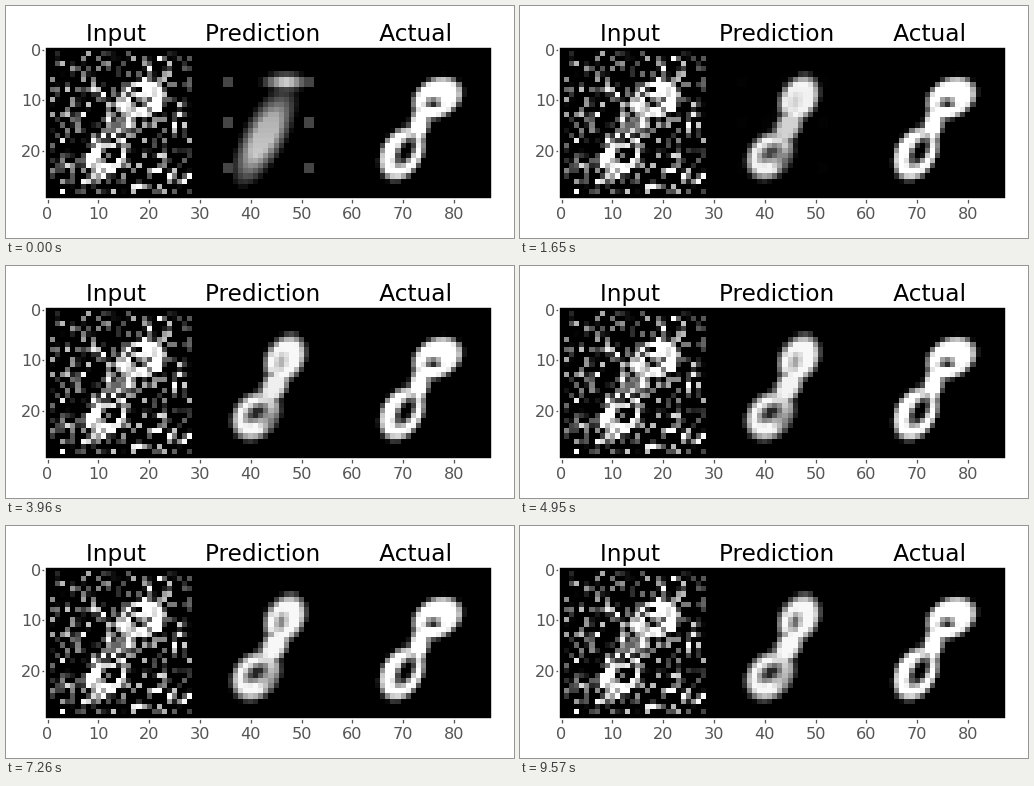
Write a matplotlib script that moves like this. It is 508x232 px and loops after 9.9 s.

```python
import numpy as np
import matplotlib.pyplot as plt
from matplotlib.animation import FuncAnimation

W, H, DPI = 508, 232, 64
FRAMES, INTERVAL = 30, 330
N = 28                          # side of one digit tile
LEFT, TOP, WIDTH = 39, 41, 447  # axes box in pixels
HEIGHT = WIDTH * (N + 2) / (3 * N + 4)
GREY = "#555555"

cols, rows = np.meshgrid(np.arange(N) + 0.5, np.arange(N) + 0.5)


def px(n):
    """Screen pixels to points."""
    return n * 72 / DPI


def ellipse(x, y, a, b, angle, soft=1.2):
    """Soft-edged ellipse; the angle turns its long side up from the right."""
    c, s = np.cos(np.radians(angle)), np.sin(np.radians(angle))
    dx, dy = cols - x, rows - y
    r = np.hypot((dx * c - dy * s) / a, (dx * s + dy * c) / b)
    return np.clip((1 - r) * min(a, b) / soft + 0.5, 0, 1)


def merge(*parts):
    return np.maximum.reduce(parts)


def actual_digit():
    body = merge(ellipse(18.2, 9.2, 5, 3.7, 30),
                 ellipse(14.6, 14.5, 4, 1.8, 75),
                 ellipse(11.3, 20, 5.4, 3.8, 60))
    eye = ellipse(17.4, 10.2, 1.2, 0.7, 0)
    loop = ellipse(12, 19.6, 2.9, 1.4, 60)
    return body * (1 - eye) * (1 - loop)


def first_guess():
    body = ellipse(13.3, 16.5, 8, 3.1, 62, 2.8) * (0.5 + 0.4 * rows / N)
    img = merge(body, 0.85 * ellipse(17.4, 6, 3.2, 1.2, 0, 1.6))
    for r in (5, 13, 22):
        for c in (5, 21):
            img[r:r + 2, c:c + 2] = np.maximum(img[r:r + 2, c:c + 2], 0.27)
    return img


def prediction(i):
    p = i / (FRAMES - 1)
    size = 1 - 0.1 * np.exp(-i / 6)
    neck = 1 - 0.4 * np.exp(-i / 5)
    body = merge(ellipse(17.3, 9.3, 4.7 * size, 3.5 * size, 60, 1.6),
                 neck * ellipse(15.2, 14.7, 4, 2.1, 60, 1.6),
                 ellipse(11.5, 20.5, 5 * size, 4 * size, 45, 1.6))
    eye = 0.62 * p ** 0.8 * ellipse(16.4, 10, 1.5, 0.9, 75, 1.4)
    loop = 0.85 * (1 - np.exp(-i / 2.5)) * ellipse(11.7, 19.9, 2.3, 1.3, 35, 1.6)
    corner = (0.6 - 0.28 * p) * ellipse(14.6, 21.4, 1.8, 1.6, 60, 2.5)
    img = 0.97 * body * (1 - eye) * (1 - loop) * (1 - corner)
    rest = 0.5 ** i
    return rest * FIRST + (1 - rest) * img


FIRST = first_guess()
ACTUAL = actual_digit()
rng = np.random.default_rng(7)
NOISY = np.clip(ACTUAL + rng.normal(0, 0.5, (N, N)), 0, 1)


def grid(i):
    """Three tiles side by side with a one-cell black border."""
    out = np.zeros((N + 2, 3 * N + 4))
    for k, tile in enumerate((NOISY, prediction(i), ACTUAL)):
        x = 1 + k * (N + 1)
        out[1:N + 1, x:x + N] = tile
    return out


plt.rcParams["font.family"] = "DejaVu Sans"
fig = plt.figure(figsize=(W / DPI, H / DPI), dpi=DPI, facecolor="white")
ax = fig.add_axes([LEFT / W, 1 - (TOP + HEIGHT) / H, WIDTH / W, HEIGHT / H])
image = ax.imshow(grid(0), cmap="gray", vmin=0, vmax=1,
                  interpolation="nearest", aspect="auto")
ax.set_xticks(range(0, 81, 10))
ax.set_yticks(range(0, 21, 10))
ax.tick_params(length=px(3.5), width=px(1.3), color=GREY, labelcolor=GREY,
               labelsize=px(16.15))
ax.tick_params(axis="x", pad=px(4.1))
ax.tick_params(axis="y", pad=px(0.1))
for spine in ax.spines.values():
    spine.set(color="white", linewidth=px(1.6))

gap = " " * 8
fig.text((LEFT + WIDTH / 2) / W, 1 - 35.5 / H,
         gap.join(["Input", "Prediction", "Actual"]), fontsize=px(23.26),
         color="black", ha="center", va="baseline")


def update(i):
    image.set_data(grid(i))
    return [image]


anim = FuncAnimation(fig, update, frames=FRAMES, interval=INTERVAL,
                     repeat=True, repeat_delay=0)
plt.show()
```
